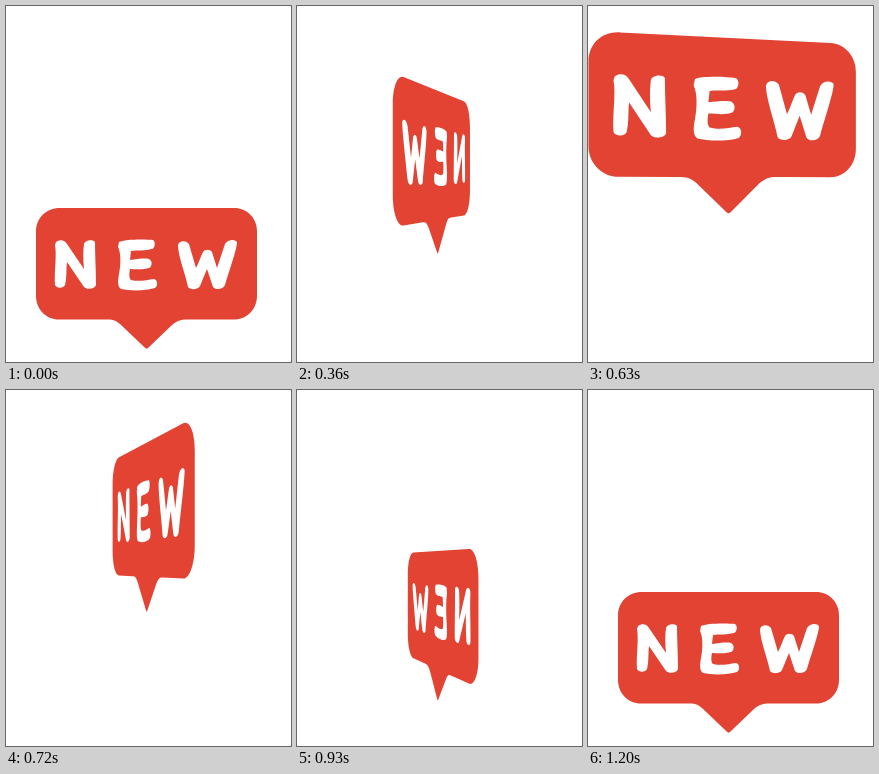
Recreate the animation shown at these times as an HTML page. Size 285 px wide and 356 px high, loop 1710 ms.

```html
<!DOCTYPE html>
<html lang="en">
<head>
<meta charset="utf-8">
<title>New badge</title>
<style>
  html, body { margin: 0; width: 100%; height: 100%; overflow: hidden; background: #fff; }
  svg { display: block; width: 100vw; height: 100vh; }
</style>
</head>
<body>
<svg viewBox="0 0 285 356" role="img" aria-label="NEW">
  <path id="bubble" fill="#e34333"/>
  <path id="word" fill="#fff"/>
</svg>
<script>
const LOOP = 1710, STEP = 30;
const CX = 140.7, CY = 176, DEPTH = 737;

const BUBBLE =
  'M54 202 L228 202 C241 202 251 212 251 225 L251 290 C251 303 241 313.5 228 313.5 ' +
  'L182 313.5 C174 313.5 171 315 166 319 L142.5 341.5 C141.3 343 140 343 138.7 341.5 ' +
  'L114 318 C109 314 107 313.5 99 313.5 L53 313.5 C40 313.5 30 303 30 290 ' +
  'L30 226 C30 212 40 202 54 202 Z';

const WORD =
  // N
  'M50 236 C54 233 59 234 61 238 L78 263 C77 254 77 245 78 238 C79 234 87 233 89 236 ' +
  'C89 250 90 265 90 279 C89 283 81 284 78 281 L61 256 C60 264 61 272 59 279 ' +
  'C57 283 50 282 49 279 C48 266 51 250 49 239 Z ' +
  // E
  'M113 236 C118 233 140 233 147 234 C150 236 149 242 146 243 C139 245 131 244 125 245 ' +
  'L124 254 C131 253 139 252 143 253 C147 255 146 261 143 262 C137 264 130 263 124 263 ' +
  'C123 268 123 272 125 274 C133 276 141 274 148 273 C152 274 152 280 149 282 ' +
  'C140 285 124 285 115 283 C111 280 112 274 113 268 C115 258 115 247 112 241 Z ' +
  // W
  'M173 237 C176 234 181 235 183 238 L190 262 C193 256 195 250 197 246 ' +
  'C199 243 204 243 206 246 L211 262 L219 238 C222 233 229 233 231 236 ' +
  'C231 243 224 262 219 279 C217 284 209 284 207 281 L201 263 L194 280 ' +
  'C192 284 184 284 182 281 C180 270 172 250 172 239 Z';

const bubble = document.getElementById('bubble');
const word = document.getElementById('word');

// Smooth 0..1 ramp between two times
function ease(t, from, to) {
  const u = Math.min(1, Math.max(0, (t - from) / (to - from)));
  return u * u * (3 - 2 * u);
}

function pose(t) {
  const dip = t > 1090 && t < 1200 ? 8 * Math.sin(Math.PI * (t - 1090) / 110) ** 2 : 0;
  return {
    angle: 4 * Math.PI * ease(t, 90, 1200),
    lift: 141.5 * (ease(t, 0, 540) - ease(t, 635, 1090)) - dip,
    zoom: 1 + 0.265 * (ease(t, 90, 570) - ease(t, 540, 1110))
  };
}

// Turn the flat shape about its vertical axis and view it in perspective
function project(shape, { angle, lift, zoom }) {
  const cos = Math.cos(angle), sin = Math.sin(angle);
  return shape.replace(/([\d.]+) ([\d.]+)/g, (_, px, py) => {
    const x = (px - CX) * zoom, y = (py - CY - lift) * zoom;
    const k = 1 / (1 - x * sin / DEPTH);
    return (CX + x * cos * k).toFixed(2) + ' ' + (CY + y * k).toFixed(2);
  });
}

function draw(time) {
  const t = Math.floor(time % LOOP / STEP) * STEP;
  const p = pose(t);
  bubble.setAttribute('d', project(BUBBLE, p));
  word.setAttribute('d', project(WORD, p));
}

const start = performance.now();
function tick() {
  draw(performance.now() - start);
  requestAnimationFrame(tick);
}
tick();
</script>
</body>
</html>
```
